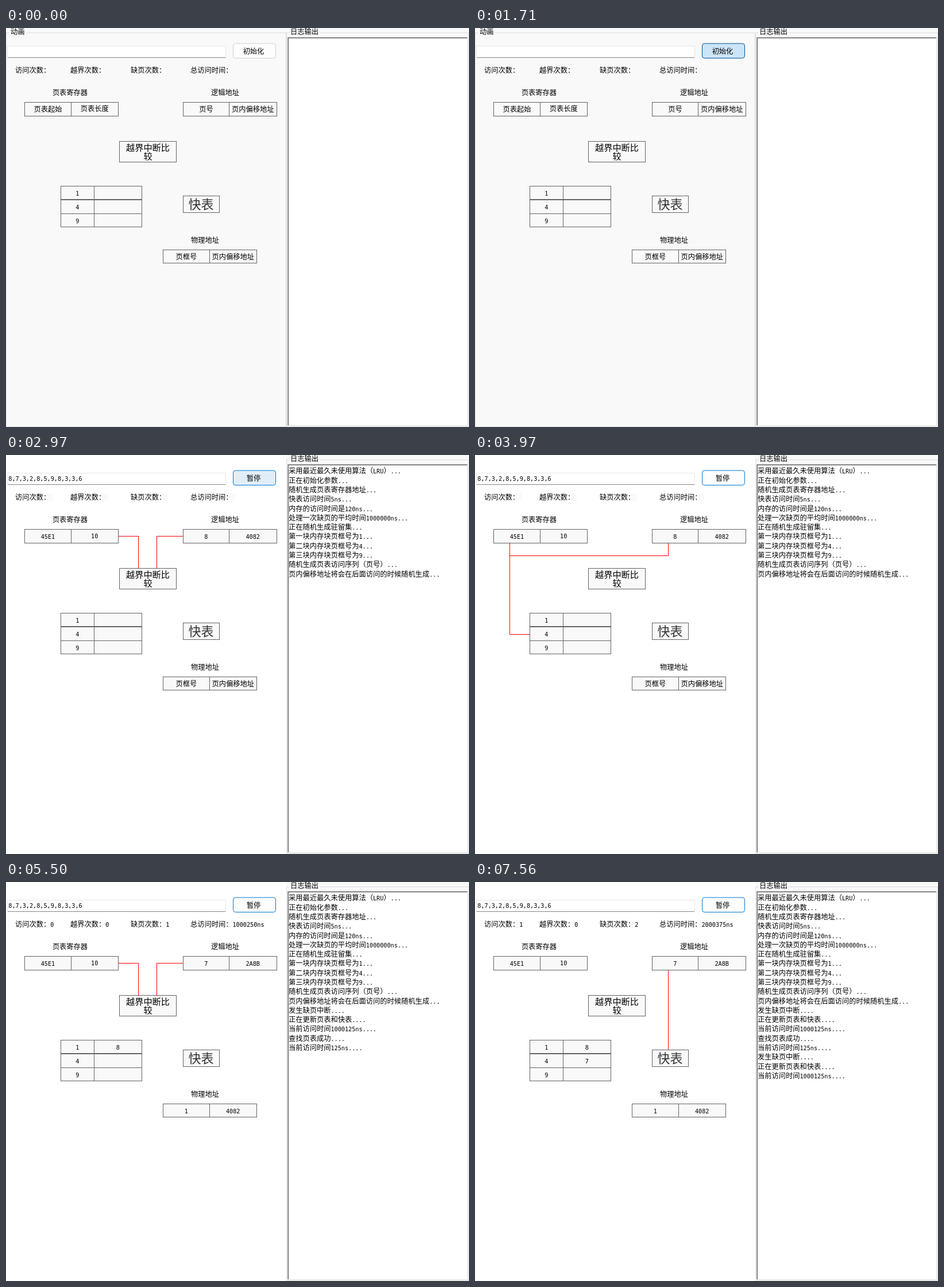
Recreate the animation shown at these times as an HTML page. Size 806 by 695 pixels, loop 8000 ms.

```html
<!DOCTYPE html>
<html lang="zh-CN">
<head>
<meta charset="utf-8">
<title>分页地址变换</title>
<style>
html, body { margin: 0; width: 100%; height: 100%; overflow: hidden; background: #f9f9f9; }
svg { display: block; width: 806px; height: 695px; }
text { font-family: "Noto Sans CJK SC", "Noto Sans CJK", "Noto Sans Mono CJK SC", sans-serif; fill: #000; }
.thin { font-family: "Noto Sans CJK SC Light", "Noto Sans CJK SC", "Noto Sans CJK", sans-serif; font-weight: 300; fill: #333; }
.latin { font-family: "DejaVu Sans Mono", "Liberation Mono", monospace; }
rect, path { shape-rendering: crispEdges; }
.smooth { shape-rendering: auto; }
</style>
</head>
<body>
<svg id="stage" viewBox="0 0 806 695"></svg>
<script>
const LOOP = 8000;
const EM = 12.25;
const PANEL = "#f9f9f9";
const EDGE = "#646464";
const stage = document.getElementById("stage");

const LOG = [
  "采用最近最久未使用算法（LRU）...",
  "正在初始化参数...",
  "随机生成页表寄存器地址...",
  "快表访问时间5ns...",
  "内存的访问时间是120ns...",
  "处理一次缺页的平均时间1000000ns...",
  "正在随机生成驻留集...",
  "第一块内存块页框号为1...",
  "第二块内存块页框号为4...",
  "第三块内存块页框号为9...",
  "随机生成页表访问序列（页号）...",
  "页内偏移地址将会在后面访问的时候随机生成...",
  "发生缺页中断....",
  "正在更新页表和快表....",
  "当前访问时间1000125ns....",
  "查找页表成功....",
  "当前访问时间125ns....",
  "发生缺页中断....",
  "正在更新页表和快表....",
  "当前访问时间1000125ns...."
];

const WIRES = {
  compare: "M196 141.5H230.5V198M308 141.5H262.5V198",
  cache: "M336.5 154V292",
  table: "M60.5 154V312.5H95M336.5 154V175.5H60.5"
};

const BUTTON = {
  idle: ["#fdfdfd", "#d0d0d0"],
  hover: ["#e0eef9", "#0078d4"],
  down: ["#cce4f7", "#005499"],
  focus: ["#fdfdfd", "#0078d4"]
};

// Each step lists only what changes from the step before it.
const STEPS = [
  [0, {
    button: "idle", label: "初始化", input: "", lines: 0, running: false, wire: "",
    register: ["页表起始", "页表长度"], logical: ["页号", "页内偏移地址"],
    physical: ["页框号", "页内偏移地址"], pages: ["", "", ""], stats: ["", "", "", ""]
  }],
  [1050, { button: "hover" }],
  [1710, { button: "down" }],
  [1840, { button: "hover", label: "开始", input: "8,7,3,2,8,5,9,8,3,3,6", lines: 12, register: ["45E1", "10"] }],
  [2840, { button: "down" }],
  [2970, { button: "hover", label: "暂停", running: true, logical: ["8", "4082"], wire: "compare" }],
  [3170, { button: "focus" }],
  [3440, { wire: "cache" }],
  [3970, { wire: "table" }],
  [4500, { wire: "compare", lines: 15, pages: ["8", "", ""], stats: ["0", "0", "1", "1000125ns"] }],
  [4970, { wire: "cache" }],
  [5500, { wire: "compare", lines: 17, logical: ["7", "2A8B"], physical: ["1", "4082"], stats: ["0", "0", "1", "1000250ns"] }],
  [6030, { wire: "cache" }],
  [6510, { wire: "table" }],
  [7030, { wire: "compare", lines: 20, pages: ["8", "7", ""], stats: ["1", "0", "2", "2000375ns"] }],
  [7560, { wire: "cache" }]
];

let last = {};
const states = STEPS.map(([at, change]) => (last = { ...last, ...change, at }));

function add(name, attrs, parent = stage) {
  const el = document.createElementNS("http://www.w3.org/2000/svg", name);
  for (const key in attrs) el.setAttribute(key, attrs[key]);
  parent.appendChild(el);
  return el;
}

function fillRect(x, y, width, height, fill) {
  return add("rect", { x, y, width, height, fill });
}

function line(d, stroke, width = 1) {
  return add("path", { d, stroke, fill: "none", "stroke-width": width });
}

// Latin runs are sized so that each character takes half an em.
function write(str, x, mid, anchor = "start", size = EM) {
  if (!str) return null;
  const el = add("text", { x, y: mid + size * 0.36, "font-size": size, "text-anchor": anchor });
  for (const run of str.match(/[!-~]+|[^!-~]+/g)) {
    const span = add("tspan", {}, el);
    span.textContent = run;
    if (/^[!-~]/.test(run)) {
      span.setAttribute("class", "latin");
      span.setAttribute("font-size", size / 1.204);
    }
  }
  return el;
}

const center = (str, x, mid, size) => write(str, x, mid, "middle", size);

function box(x, y, width, height) {
  add("rect", { x: x + 0.5, y: y + 0.5, width, height, fill: PANEL, stroke: EDGE });
}

function pair(x, y, width, split, height, cells, mids) {
  box(x, y, width, height);
  line(`M${split + 0.5} ${y}v${height}`, EDGE);
  center(cells[0], (x + split) / 2 + 0.4, mids[0]);
  center(cells[1], (split + x + width) / 2 + 0.2, mids[1]);
}

function drawLog(count) {
  line("M493 8.5H488.5V694.5H805.5V8.5H546", "#dcdcdc");
  write("日志输出", 495, 6.2);
  fillRect(490, 16, 314, 677, "#e3e3e3");
  fillRect(490, 16, 313, 676, "#a0a0a0");
  fillRect(491, 17, 312, 675, "#696969");
  fillRect(492, 18, 311, 674, "#fff");
  LOG.slice(0, count).forEach((str, i) => write(str, 492, 28 + i * 16.29));
}

function drawControls(s) {
  fillRect(2, 31, 381, 21, "#e6e6e6");
  fillRect(3, 32, 379, 19, "#fff");
  fillRect(3, 51, 379, 1, "#868686");
  write(s.input, 4.3, 40.2);
  const [fill, stroke] = BUTTON[s.button];
  add("rect", { x: 395.5, y: 27, width: 74, height: 25.5, rx: 4, fill, stroke, class: "smooth" });
  center(s.label, 431, 40.2);
  const names = ["访问次数：", "越界次数：", "缺页次数：", "总访问时间："];
  [16, 112, 217, 321].forEach((x, i) => {
    const start = x + names[i].length * EM;
    fillRect(start - 6, 67, s.stats[i] ? s.stats[i].length * 6.2 + 6 : 10, 13, PANEL);
    write(names[i], x, 73.8);
    write(s.stats[i], start, 73.8);
  });
}

function drawTables(s) {
  center("页表寄存器", 111.5, 112.3);
  center("逻辑地址", 381.5, 112.3);
  center("物理地址", 346.5, 369.3);
  pair(32, 129, 163, 113, 24, s.register, [142, 141]);
  pair(308, 129, 163, 388, 24, s.logical, [142, 142]);
  pair(273, 386, 163, 354, 23, s.physical, [398.3, 398.3]);
  box(197, 197, 99, 36);
  center("越界中断比", 247, 208.5, 15.2);
  center("较", 247, 223.5, 15.2);
  [[275, 24, 287.3], [299, 24, 312], [323, 23, 335.3]].forEach(([y, height, mid], i) =>
    pair(95, y, 141, 153, height, [["1", "4", "9"][i], s.pages[i]], [mid, mid]));
  line("M95 299H237", EDGE, 2);
  box(308, 292, 63, 29);
  center("快表", 339.5, 306.8, 22).setAttribute("class", "thin");
}

function draw(s) {
  stage.textContent = "";
  fillRect(0, 0, 806, 695, PANEL);
  if (s.running) {
    fillRect(0, 0, 488, 695, "#fff");
  } else {
    line("M5 8.5H0.5V694.5H487.5V8.5H35", "#dcdcdc");
    write("动画", 8, 6.2);
  }
  drawLog(s.lines);
  drawControls(s);
  drawTables(s);
  if (s.wire) line(WIRES[s.wire], "#f00");
}

let shown = null;
function tick() {
  const t = performance.now() % LOOP;
  const now = states.filter(s => s.at <= t).pop();
  if (now !== shown) draw(shown = now);
  requestAnimationFrame(tick);
}
tick();
</script>
</body>
</html>
```
